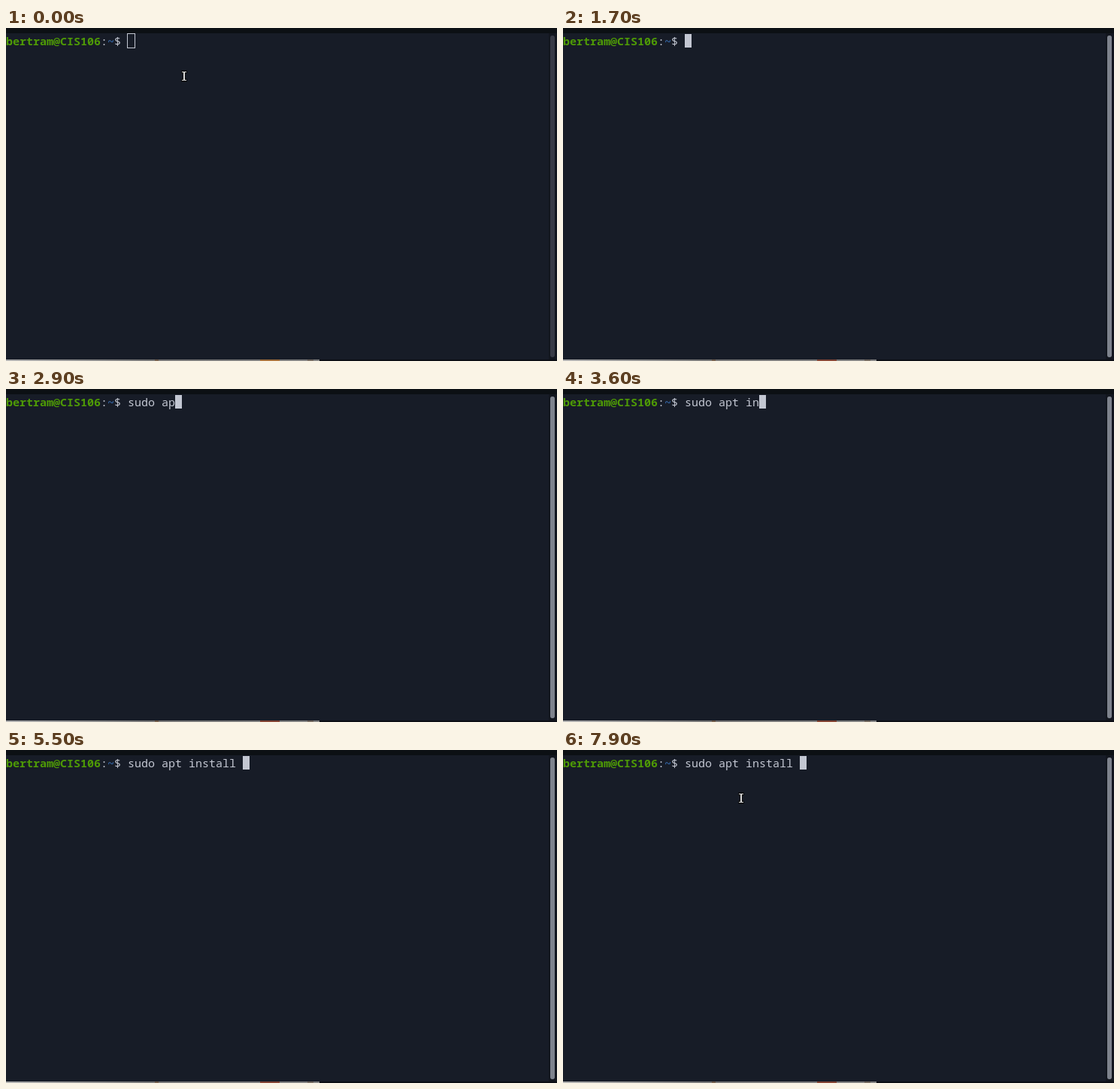
Recreate the animation shown at these times as an HTML page. Size 733 px wide and 443 px high, loop 8 s.

```html
<!DOCTYPE html>
<html lang="en">
<head>
<meta charset="utf-8">
<title>Terminal</title>
<style>
  html, body { margin: 0; width: 100%; height: 100%; overflow: hidden; background: #171c27; }
  svg { display: block; width: 733px; height: 443px; }
  text { font: 15px "Noto Sans Mono", "DejaVu Sans Mono", monospace; fill: #c3c7d2; white-space: pre; }
  .user { font-weight: 700; fill: #4e9a06; }
  .path { font-weight: 700; fill: #3465a4; }
</style>
</head>
<body>
<svg viewBox="0 0 733 443">
  <defs>
    <linearGradient id="edge">
      <stop offset="0" stop-color="#b0b0b0"/>
      <stop offset=".45" stop-color="#787878"/>
      <stop offset="1" stop-color="#848484"/>
    </linearGradient>
  </defs>
  <rect width="733" height="443" fill="#171c27"/>
  <rect width="733" height="7" fill="#0c1014"/>
  <rect x="722" y="7" width="11" height="434" fill="#12161e"/>
  <rect x="724" y="10" width="6" height="428" rx="3" fill="#383b46"/>
  <rect id="thumb" x="724" y="10" width="6" height="428" rx="3" fill="#7e838d"/>

  <rect y="441" width="733" height="2" fill="#0c0e15"/>
  <rect y="441" width="417" height="2" fill="url(#edge)"/>
  <rect x="198" y="441" width="5" height="2" fill="#75604f"/>
  <rect x="338" y="441" width="26" height="2" fill="#a5703c"/>
  <rect id="patch" x="338" y="441" width="26" height="2" fill="#854636"/>
  <rect x="401" y="441" width="8" height="2" fill="#756b62"/>

  <text class="user" x="0" y="23">bertram@CIS106</text>
  <text x="126" y="23">:</text>
  <text class="path" x="135" y="23">~</text>
  <text x="144" y="23">$</text>
  <text id="typed" x="162" y="23"></text>
  <rect id="hollow" x="161.5" y="7.5" width="10" height="19" fill="none" stroke="#c3c7d2"/>
  <rect id="block" y="8" width="9" height="18" fill="#c3c7d2"/>

  <g id="pointer" fill="none">
    <path d="M233 58.5H241M233 69.5H241M237 58V70" stroke="#0b0c10" stroke-width="4"/>
    <path d="M234 58.5H240M234 69.5H240" stroke="#d8d8d8"/>
    <path d="M237 58V70" stroke="#d8d8d8" stroke-width="2"/>
  </g>
</svg>
<script>
const LOOP = 8000, STEP = 100, CELL = 9, START = 162;
const FOCUS = 400, HIDE = 1700, MOVE = 7900;

// bursts of evenly spaced keys: text, first key, last key
const bursts = [
  ["sudo", 1900, 2100], [" ap", 2700, 2900], ["t ", 3200, 3200], ["i", 3400, 3400],
  ["nsta", 3600, 3900], ["ll", 4200, 4200], [" ", 5500, 5500]
];
// each moment flips the block cursor
const flips = [1000, 1700, 4700, 5100, 5700, 6000, 6400, 6500, 7500, 7600];

const $ = id => document.getElementById(id);
const show = (id, on) => $(id).setAttribute("visibility", on ? "visible" : "hidden");
const clamp = v => Math.min(1, Math.max(0, v));

function typedPart([text, first, last], t) {
  if (t < first) return "";
  if (t >= last) return text;
  return text.slice(0, 1 + Math.floor((t - first) / (last - first) * (text.length - 1)));
}

function draw(t) {
  const text = bursts.map(b => typedPart(b, t)).join("");
  const flipped = flips.filter(f => f <= t).length % 2;
  const lit = clamp((t - FOCUS + STEP) / (2 * STEP));

  $("typed").textContent = text;
  $("block").setAttribute("x", START + text.length * CELL);
  show("block", t >= FOCUS && !flipped);
  show("hollow", t < FOCUS);
  show("pointer", t < HIDE || t >= MOVE);
  for (const id of ["thumb", "patch"]) $(id).setAttribute("opacity", lit);
}

// the screen refreshes once per step
const begin = performance.now();
function tick() {
  const t = (performance.now() - begin) % LOOP;
  draw(Math.floor(t / STEP) * STEP);
  requestAnimationFrame(tick);
}
draw(0);
requestAnimationFrame(tick);
</script>
</body>
</html>
```
